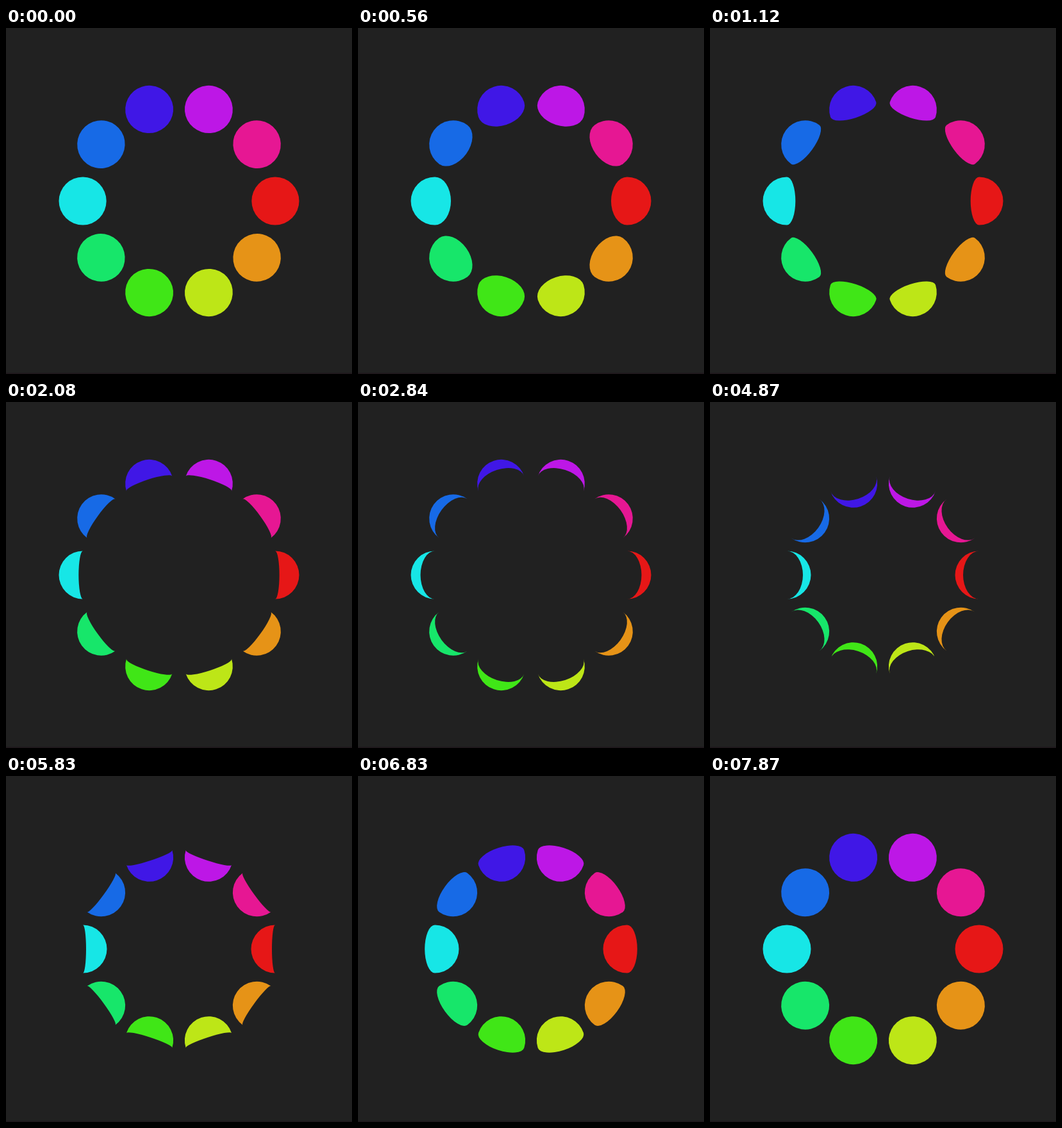
Animation of 540x540 px, one loop 8.02 s. Source, as an HTML page with a canvas:

```html
<!DOCTYPE html>
<html>
<head>
<meta charset="utf-8">
<title>Moon phase ring</title>
<style>
html, body { margin: 0; height: 100%; overflow: hidden; background: #212121; }
canvas { display: block; }
</style>
</head>
<body>
<canvas width="540" height="540"></canvas>
<script>
const ctx = document.querySelector('canvas').getContext('2d');
const LOOP = 8020, WAX_START = 4310, STEP = 40, STEPS = 90;
const COUNT = 10, RING = 150, R = 37.5;

// Half disc on the right, closed by a half ellipse reaching x = edge.
function moon(edge) {
  ctx.beginPath();
  ctx.arc(0, 0, R, -Math.PI / 2, Math.PI / 2);
  ctx.ellipse(0, 0, Math.abs(edge), R, 0, Math.PI / 2, -Math.PI / 2, edge > 0);
  ctx.fill();
}

function draw(t) {
  const waxing = t >= WAX_START;
  const step = Math.min(Math.floor((waxing ? t - WAX_START : t) / STEP) + 1, STEPS);
  const edge = R * (2 * step / STEPS - 1);

  ctx.fillStyle = '#212121';
  ctx.fillRect(0, 0, 540, 540);
  ctx.fillStyle = '#1f191c';
  ctx.fillRect(0, 538, 540, 2);
  if (!waxing && step === STEPS) return;

  for (let i = 0; i < COUNT; i++) {
    ctx.save();
    ctx.translate(270, 270);
    ctx.rotate(i * 2 * Math.PI / COUNT);
    ctx.translate(RING, 0);
    if (waxing) ctx.scale(-1, 1);
    ctx.fillStyle = `hsl(${i * 360 / COUNT}, 81.8%, 49.6%)`;
    moon(waxing ? -edge : edge);
    ctx.restore();
  }
}

const start = performance.now();
function tick() {
  draw((performance.now() - start) % LOOP);
  requestAnimationFrame(tick);
}
tick();
</script>
</body>
</html>
```
